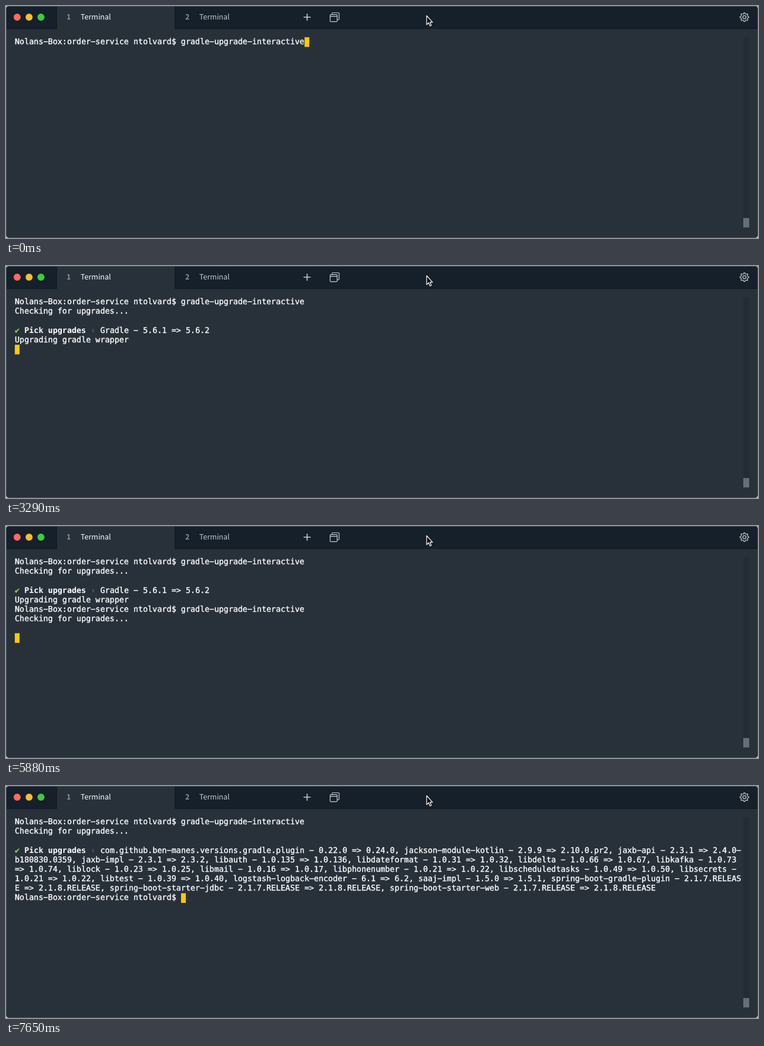
Recreate the animation shown at these times as an HTML page. Size 1280 by 395 pixels, loop 8 s.

```html
<!DOCTYPE html>
<html lang="en">
<head>
<meta charset="utf-8">
<title>Terminal</title>
<style>
  html, body { margin: 0; width: 100%; height: 100%; overflow: hidden; background: #dfe2e4; }
  svg { display: block; width: 100%; height: 100%; }
  text { white-space: pre; text-rendering: geometricPrecision; }
  #screen { font: 13.43px "DejaVu Sans Mono", monospace; color: #fff; fill: currentColor; }
  #screen text { fill: currentColor; stroke: currentColor; stroke-width: .35; }
  #screen rect { fill: currentColor; }
  #screen .bold { font-weight: 700; stroke: none; }
  #screen .cyan { color: #52cfe9; }
  #screen .green { color: #94cb4d; }
  #screen .dim { color: #59636b; }
  #screen .soft { color: #90989f; }
  #screen .cursor { color: #ffc900; }
  #screen circle { stroke: currentColor; stroke-width: 1.1; fill: none; }
  #screen .dot { fill: currentColor; stroke: none; }
  .tab { font: 12.5px "Noto Sans CJK JP", "Noto Sans", sans-serif; fill: #c3c8cc; }
  .active { fill: #fff; }
  .num { font-weight: 700; fill: #87929a; }
  .icon { fill: none; stroke: #c9ced2; stroke-width: 1.2; stroke-linejoin: round; }
</style>
</head>
<body>
<svg viewBox="0 0 1280 395" preserveAspectRatio="none">
  <rect width="1280" height="395" rx="5" fill="#28313a"/>
  <path d="M0 38V5Q0 0 5 0H1275Q1280 0 1280 5V38Z" fill="#15202a"/>
  <path d="M0 38.5H86.5V1M287.5 1V38.5H1280" fill="none" stroke="#10181f"/>
  <rect x="87" y="1" width="200" height="39" fill="#28313a"/>
  <rect x=".5" y=".5" width="1279" height="394" rx="5" fill="none" stroke="#4a555e"/>
  <circle cx="19" cy="19" r="6" fill="#ff6a5e"/>
  <circle cx="39.3" cy="19" r="6" fill="#fdbd2f"/>
  <circle cx="59.5" cy="19" r="6" fill="#3dcc42"/>
  <text class="tab num" x="103" y="23">1</text>
  <text class="tab active" x="127" y="23">Terminal</text>
  <text class="tab num" x="305" y="23">2</text>
  <text class="tab" x="329" y="23">Terminal</text>
  <path class="icon" d="M506.5 19H518.5M512.5 13V25" style="stroke-width:1.6"/>
  <path class="icon" d="M555 14.5V13Q555 11.500 556.500 11.500H565.500Q567 11.500 567 13V22Q567 23.500 565.500 23.500H564"/>
  <rect class="icon" x="551.7" y="14.7" width="12" height="12" rx="1.5"/>
  <path class="icon" d="M551.7 17.7H563.7"/>
  <g transform="translate(1256.8 19)">
    <path id="gear" class="icon"/>
    <circle class="icon" r="2.7"/>
  </g>
  <rect x="1255" y="53" width="10" height="324" fill="#232b33"/>
  <rect x="1255" y="361" width="10" height="16" fill="#666e76"/>
  <g id="screen"></g>
  <path d="M716 16.5V31.7L719.4 28.5L721.7 34L724 33L721.7 27.6H726Z"
        fill="#0b0d0f" stroke="#fff" stroke-width="1.2" stroke-linejoin="round"/>
</svg>
<script>
const LOOP = 8000;
const LEFT = 15, TOP = 53.2, CELL = 8.085, ROW = 16.17, COLS = 153;
const screen = document.getElementById('screen');

const PROMPT = 'Nolans-Box:order-service ntolvard$ ';
const COMMAND = 'gradle-upgrade-interactive';
const CHECKING = 'Checking for upgrades...';

const items = `Gradle 5.6.1 5.6.2
com.github.ben-manes.versions.gradle.plugin 0.22.0 0.24.0
flyway-core 5.2.4 6.0.1
jackson-module-kotlin 2.9.9 2.10.0.pr2
jaxb-api 2.3.1 2.4.0-b180830.0359
jaxb-impl 2.3.1 2.3.2
libauth 1.0.135 1.0.136
libdateformat 1.0.31 1.0.32
libdelta 1.0.66 1.0.67
libkafka 1.0.73 1.0.74
liblock 1.0.23 1.0.25
libmail 1.0.16 1.0.17
libphonenumber 1.0.21 1.0.22
libscheduledtasks 1.0.49 1.0.50
libsecrets 1.0.21 1.0.22
libtest 1.0.39 1.0.40
logstash-logback-encoder 6.1 6.2
saaj-impl 1.5.0 1.5.1
spring-boot-gradle-plugin 2.1.7.RELEASE 2.1.8.RELEASE
spring-boot-starter-jdbc 2.1.7.RELEASE 2.1.8.RELEASE
spring-boot-starter-web 2.1.7.RELEASE 2.1.8.RELEASE`.split('\n').map(line => {
  const [name, from, to] = line.split(' ');
  return `${name} - ${from} => ${to}`;
});

function add(tag, attrs, text = '') {
  const el = document.createElementNS('http://www.w3.org/2000/svg', tag);
  for (const key in attrs) el.setAttribute(key, attrs[key]);
  el.textContent = text;
  screen.append(el);
}

const colX = col => LEFT + col * CELL;
const rowY = row => TOP + row * ROW;

// The terminal face has a wide hyphen; the minus glyph has that shape here.
function print(row, col, text, style = '') {
  add('text', { x: colX(col), y: rowY(row) + 11.8, class: style }, text.replaceAll('-', '\u2212'));
}

function cursor(row, col = 0) {
  add('rect', { x: colX(col), y: rowY(row), width: CELL, height: 16.4, class: 'cursor' });
}

function radio(row, on) {
  const at = { cx: 19.5, cy: rowY(row) + 8.3 };
  add('circle', { ...at, r: 3.8, class: on ? 'green' : '' });
  if (on) add('circle', { ...at, r: 2.2, class: 'green dot' });
}

function command(row = 0) {
  print(row, 0, PROMPT + COMMAND);
}

function checking() {
  command();
  print(1, 0, CHECKING);
}

function question(mark, color) {
  checking();
  print(3, 0, mark, color);
  print(3, 2, 'Pick upgrades', 'bold');
  print(3, 16, '›', 'dim');
}

// Ten visible choices from `first`; `active` is highlighted, `isOn` tells which are picked.
function picker(first, active, isOn) {
  question('?', 'cyan');
  print(4, 0, 'Instructions:');
  ['↑/↓: Highlight option', '←/→/[space]: Toggle selection', 'a: Toggle all', 'enter/return: Complete answer']
    .forEach((text, i) => print(5 + i, 4, text));
  items.slice(first, first + 10).forEach((text, i) => {
    const row = 9 + i, index = first + i, lit = index === active;
    radio(row, isOn(index));
    print(row, 3, text, lit ? 'cyan' : '');
    if (!lit) return;
    add('rect', { x: colX(3), y: rowY(row) + 14.9, width: text.length * CELL, height: 1.2, class: 'cyan' });
    if (index === 0) print(row, 3 + text.length, ' - Upgrades the gradle wrapper', 'dim');
  });
  print(19, 0, '(Move up and down to reveal more choices)', 'soft');
}

function upgrading() {
  question('✔', 'green');
  print(3, 18, items[0]);
  print(4, 0, 'Upgrading gradle wrapper');
}

function again() {
  upgrading();
  command(5);
}

function checkingAgain() {
  again();
  print(6, 0, CHECKING);
}

function summary() {
  question('✔', 'green');
  const picked = items.filter((_, i) => i !== 0 && i !== 2).join(', ');
  const room = COLS - 18;
  print(3, 18, picked.slice(0, room));
  let row = 4;
  for (let i = room; i < picked.length; i += COLS) print(row++, 0, picked.slice(i, i + COLS));
  print(row, 0, PROMPT);
  cursor(row, PROMPT.length);
}

const END = PROMPT.length + COMMAND.length;
const steps = [
  [0, () => { command(); cursor(0, END); }],
  [470, () => command()],
  [650, () => { command(); cursor(1); }],
  [760, () => { checking(); cursor(3); }],
  [1180, checking],
  [1650, () => { checking(); cursor(3); }],
  [1710, () => picker(0, 0, () => false)],
  [2180, () => picker(0, 0, i => i === 0)],
  [3290, () => { upgrading(); cursor(5); }],
  [3710, upgrading],
  [3880, () => { upgrading(); print(5, 0, PROMPT); cursor(5, PROMPT.length); }],
  [4350, () => { upgrading(); print(5, 0, PROMPT); }],
  [4410, () => { again(); cursor(5, END); }],
  [4880, () => { again(); cursor(6); }],
  [4940, () => { checkingAgain(); cursor(8); }],
  [5410, checkingAgain],
  [5880, () => { checkingAgain(); cursor(8); }],
  [6240, () => picker(1, 1, () => false)],
  [6590, () => picker(1, 1, () => true)],
  [6940, () => picker(1, 2, () => true)],
  [7290, () => picker(1, 2, i => i !== 2)],
  [7650, summary]
];

// Eight-toothed gear outline
const teeth = [];
for (let i = 0; i < 32; i++) {
  const r = i % 4 < 2 ? 7.5 : 5.7, a = (i - 0.5) * Math.PI / 16;
  teeth.push(`${(r * Math.cos(a)).toFixed(2)} ${(r * Math.sin(a)).toFixed(2)}`);
}
document.getElementById('gear').setAttribute('d', `M${teeth.join('L')}Z`);

const start = performance.now();
let shown = null;
function tick() {
  const t = (performance.now() - start) % LOOP;
  const step = steps.findLast(([at]) => at <= t);
  if (step !== shown) {
    shown = step;
    screen.replaceChildren();
    step[1]();
  }
  requestAnimationFrame(tick);
}
tick();
</script>
</body>
</html>
```
